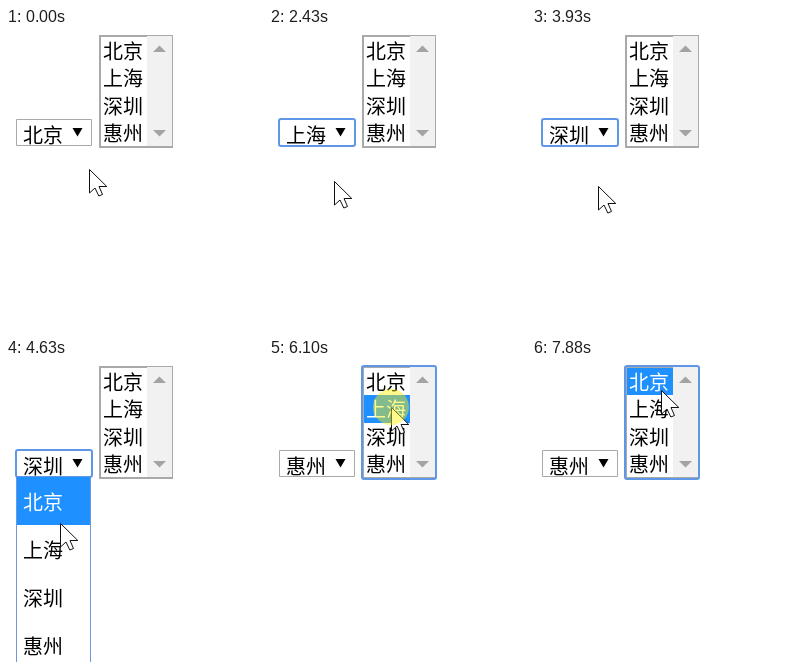
Animation of 257x303 px, one loop 8000 ms. Source, as an HTML page with a canvas:

```html
<!DOCTYPE html>
<html lang="zh-CN">
<head>
<meta charset="utf-8">
<style>
html, body { margin: 0; width: 100%; height: 100%; overflow: hidden; background: #fff; }
canvas { display: block; }
</style>
</head>
<body>
<canvas id="stage" width="257" height="303"></canvas>
<script>
const ctx = document.getElementById('stage').getContext('2d');
const LOOP = 8000;
const PAUSE = 150;   // stillness before a click, and length of a press
const GLIDE = 480;   // usual length of a pointer move
const LAG = 80;      // delay of the menu behind the pointer
const BLUE = '#1e90ff', RING = '#5f97e6', GRAY = '#a9a9a9';
const CITIES = ['北京', '上海', '深圳', '惠州'];

const rowTop = i => Math.round(9 + i * 27.33);
const optionTop = i => 118 + i * 48;

// Places the pointer visits; `at` is the moment of the click
const rest = (at, x, y) => ({ at, x, y, kind: 'rest' });
const field = at => ({ at, x: 67, y: 108, kind: 'field' });
const option = (at, row, x = 56, glide = GLIDE) => ({ at, x, y: 141 + row * 46, kind: 'option', row, glide });
const listRow = (at, row) => ({ at, x: 122, y: rowTop(row) + 12, kind: 'list', row });

const VISITS = [
  rest(100, 83, 141),
  rest(490, 72, 164),
  field(960), option(2200, 1),
  field(2970), option(3700, 2),
  field(4310), option(5560, 3, 49, 890),
  listRow(6100, 1), listRow(6550, 3), listRow(7020, 2), listRow(7580, 0),
  rest(8030, 129, 31)
];

const easeOut = (p, power) => 1 - (1 - p) ** power;
const clamp = (v, low, high) => Math.max(low, Math.min(high, v));

// The hand corrects sideways first, then slows down vertically
function pointerAt(t) {
  let { x, y } = VISITS[0];
  VISITS.slice(1).forEach((visit, i) => {
    const previous = VISITS[i];
    const released = previous.at + (previous.kind === 'rest' ? 0 : PAUSE);
    const end = visit.at - PAUSE;
    const start = Math.max(end - (visit.glide || GLIDE), released);
    const p = clamp((t - start) / (end - start), 0, 1);
    x += (visit.x - x) * easeOut(p, 9);
    y += (visit.y - y) * easeOut(p, 3);
  });
  return { x: Math.round(x), y: Math.round(y) };
}

function stateAt(t) {
  const state = { focus: '', open: false, pressed: false, value: 0, listRow: -1 };
  for (const { at, kind, row } of VISITS) {
    if (t < at || kind === 'rest') continue;
    state.pressed = t < at + PAUSE;
    state.focus = kind === 'list' ? 'list' : 'select';
    if (kind === 'list') state.listRow = row;
    if (t < at + LAG) continue;
    state.open = kind === 'field';
    if (kind === 'option') state.value = row;
  }
  return state;
}

function rect(x, y, w, h, color) {
  ctx.fillStyle = color;
  ctx.fillRect(x, y, w, h);
}

function shape(color, ...points) {
  ctx.beginPath();
  points.forEach(([x, y]) => ctx.lineTo(x, y));
  ctx.closePath();
  ctx.fillStyle = color;
  ctx.fill();
}

// Triangle around x; negative height points up
function arrow(x, base, width, height, color) {
  shape(color, [x - width / 2, base], [x + width / 2, base], [x, base + height]);
}

function frame(x, y, w, h, color, width = 1, radius = 0) {
  ctx.beginPath();
  ctx.roundRect(x + width / 2, y + width / 2, w - width, h - width, radius);
  ctx.strokeStyle = color;
  ctx.lineWidth = width;
  ctx.stroke();
}

function label(city, x, baseline, color = '#000') {
  ctx.font = '350 20px "Noto Sans CJK SC", "Noto Sans CJK", sans-serif';
  ctx.fillStyle = color;
  ctx.fillText(CITIES[city], x, baseline);
}

function drawSelect(state) {
  frame(10, 91, 76, 27, GRAY);
  if (state.focus === 'select') frame(9, 90, 78, 29, RING, 2, 2);
  label(state.value, 17, 115);
  arrow(71.5, 100, 10, 8.5, '#000');
}

function drawDropdown(hoverRow) {
  rect(10, 118, 75, 185, '#fff');
  CITIES.forEach((_, i) => {
    const active = i === hoverRow;
    if (active) rect(11, optionTop(i), 73, 48, BLUE);
    label(i, 17, optionTop(i) + 33, active ? '#fff' : '#000');
  });
  for (const x of [10, 84]) rect(x, 118, 1, 185, '#6f98d8');
}

function drawList(state) {
  frame(93, 7, 74, 113, GRAY, 2);
  rect(141, 8, 25, 110, '#f1f1f1');
  arrow(153.5, 24, 13, -6.5, '#a3a3a3');
  arrow(153.5, 102, 13, 6.5, '#a3a3a3');
  CITIES.forEach((_, i) => {
    const active = i === state.listRow;
    if (active) rect(95, rowTop(i), 46, rowTop(i + 1) - rowTop(i), BLUE);
    label(i, 97, rowTop(i) + 22, active ? '#fff' : '#000');
  });
  if (state.focus === 'list') frame(92, 6, 76, 115, RING, 2, 2);
}

function drawPointer({ x, y }, pressed) {
  ctx.save();
  ctx.translate(x + 0.5, y + 0.5);
  shape('#fff', [0, 0], [0, 23.5], [5.5, 18.5], [9.3, 26.5], [13, 25], [9.5, 17], [17.3, 17]);
  ctx.strokeStyle = '#111';
  ctx.lineWidth = 1;
  ctx.stroke();
  ctx.restore();
  if (pressed) {
    ctx.beginPath();
    ctx.arc(x, y, 18, 0, Math.PI * 2);
    ctx.fillStyle = 'rgba(255, 240, 0, 0.45)';
    ctx.fill();
  }
}

function draw(t) {
  const state = stateAt(t);
  rect(0, 0, 257, 303, '#fff');
  drawSelect(state);
  drawList(state);
  if (state.open) {
    const row = Math.floor((pointerAt(t - LAG).y - optionTop(0)) / 48);
    drawDropdown(clamp(row, 0, 3));
  }
  drawPointer(pointerAt(t), state.pressed);
}

const began = performance.now();
function tick() {
  draw((performance.now() - began) % LOOP);
  requestAnimationFrame(tick);
}
tick();
</script>
</body>
</html>
```
